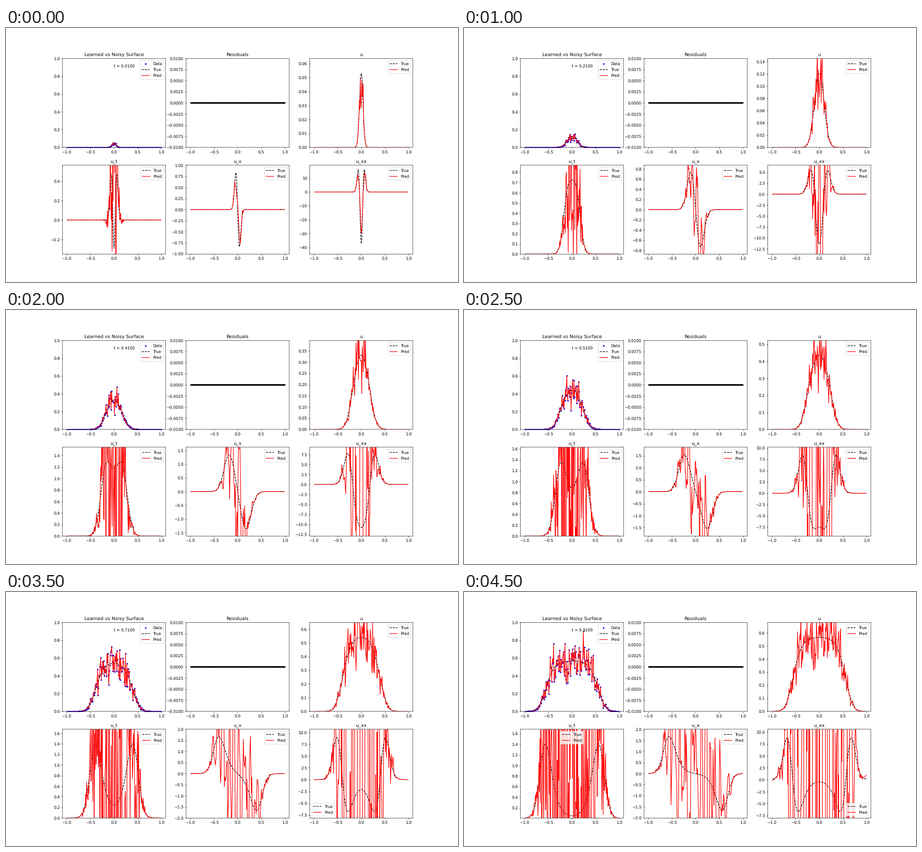
A matplotlib script for the animation above (5 s loop, 998 px wide and 561 px high).

```python
from math import factorial

import numpy as np
import matplotlib.pyplot as plt
from matplotlib.animation import FuncAnimation

plt.rcParams["font.family"] = "DejaVu Sans"
plt.rcParams["text.hinting"] = "none"
plt.rcParams["path.snap"] = False

DIFF, GROWTH, CROWD = 0.02, 10.0, 17.5
STEP = 0.01
NOISE = 0.23


def rate(u):
    """Right-hand side of the Fisher-KPP equation, no-flux ends."""
    p = np.pad(u, 1, mode="reflect")
    lap = (p[2:] - 2 * u + p[:-2]) / STEP**2
    return DIFF * lap + GROWTH * u - CROWD * u**2


def solve(u, rows=101, sub=10):
    h = STEP / sub
    out = [u]
    for _ in range(rows - 1):
        for _ in range(sub):
            a = rate(u)
            b = rate(u + h / 2 * a)
            c = rate(u + h / 2 * b)
            d = rate(u + h * c)
            u = u + h / 6 * (a + 2 * b + 2 * c + d)
        out.append(u)
    return np.array(out)


def local_fit(values, order, half, deg=3):
    """Derivative along the last axis from sliding cubic fits."""
    n, width = values.shape[-1], 2 * half + 1
    out = np.empty_like(values)
    for i in range(n):
        lo = min(max(i - half, 0), n - width)
        k = np.arange(width) + lo - i
        basis = np.vander(k, deg + 1, increasing=True).astype(float)
        w = np.linalg.pinv(basis)[order] * factorial(order) / STEP**order
        out[..., i] = values[..., lo:lo + width] @ w
    return out


grid = np.linspace(-1, 1, 201)
field = solve(0.1 / 1.75 * np.exp(-500 * grid**2))
x = grid[1:-1]

u = field[1:-1, 1:-1]
u_t = (field[2:, 1:-1] - field[:-2, 1:-1]) / (2 * STEP)
u_x = (field[1:-1, 2:] - field[1:-1, :-2]) / (2 * STEP)
u_xx = (field[1:-1, 2:] - 2 * u + field[1:-1, :-2]) / STEP**2

# Noise grows with the height of the surface; the data peaks at 1
rng = np.random.default_rng(7)
noise = NOISE * u * rng.standard_normal(u.shape)
noise = np.clip(u + noise, 0, 1) - u

data = u + noise
panels = [
    ("u", u, data),
    ("u_t", u_t, u_t + local_fit(noise.T, 1, 5).T),
    ("u_x", u_x, u_x + local_fit(noise, 1, 6)),
    ("u_xx", u_xx, u_xx + local_fit(noise, 2, 6)),
]

# Legends that leave the upper right corner
LEGENDS = {("u_t", 9): "upper center", ("u_xx", 7): "lower left",
           ("u_xx", 8): "lower left", ("u_xx", 9): "lower right"}

fig, axes = plt.subplots(2, 3, figsize=(16, 8.9941), dpi=62.375)
axes = axes.ravel()


def curves(ax, true, pred):
    ax.plot(x, true, "k--", label="True")
    ax.plot(x, pred, "r-", label="Pred")


def limits(true):
    """Range of the true curve with headroom, resting on a near-zero floor."""
    low, high = 1.2 * true.min(), 1.2 * true.max()
    return (0 if 0 < low < high / 600 else low), high


def draw(frame):
    row = 10 * frame
    for ax in axes:
        ax.clear()

    ax = axes[0]
    ax.plot(x, data[row], "b.", label="Data")
    curves(ax, u[row], data[row])
    ax.text(0, 0.9, f"t = {(row + 1) * STEP:.4f}")
    ax.set_ylim(0, 1)
    ax.set_title("Learned vs Noisy Surface")
    ax.legend(loc="upper right")

    axes[1].plot(x, np.zeros_like(x), "k.")
    axes[1].set_ylim(-0.01, 0.01)
    axes[1].set_title("Residuals")

    for ax, (name, true, pred) in zip(axes[2:], panels):
        curves(ax, true[row], pred[row])
        ax.set_ylim(*limits(true[row]))
        ax.set_title(name)
        ax.legend(loc=LEGENDS.get((name, frame), "upper right"))
    return []


anim = FuncAnimation(fig, draw, frames=10, interval=500, init_func=lambda: [],
                     repeat=True, repeat_delay=0, blit=False)
plt.show()
```
